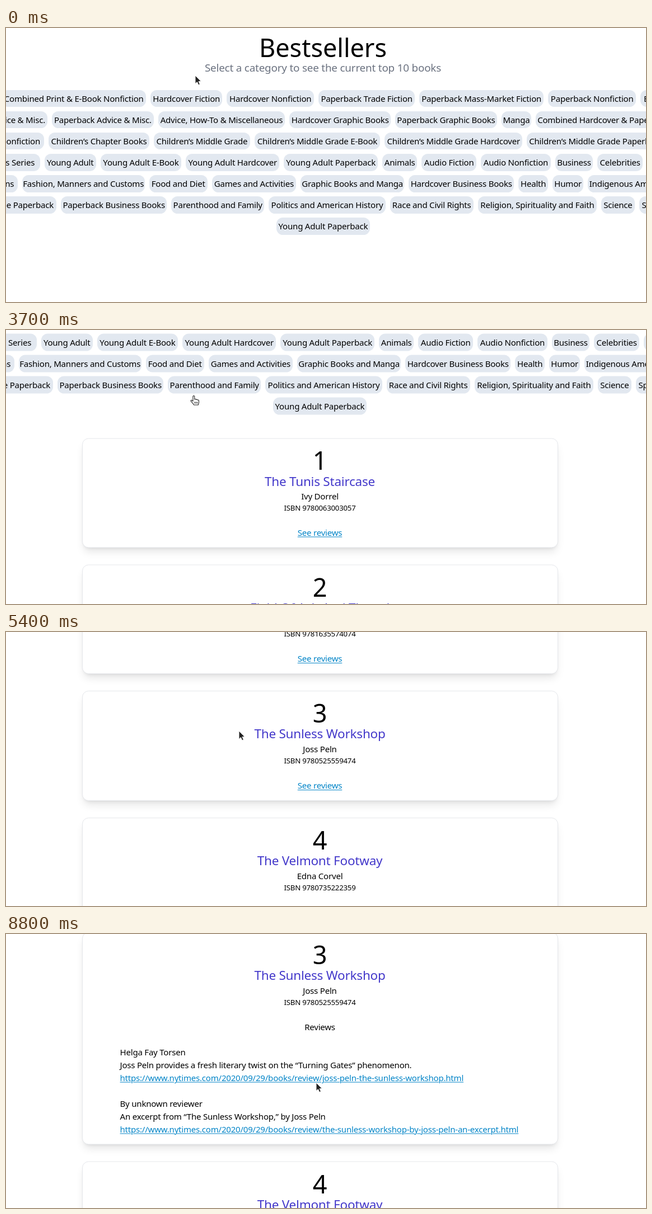
Write an HTML page that moves like this. It is 1143x490 px and loops after 9300 ms.

```html
<!DOCTYPE html>
<html lang="en">
<head>
<meta charset="utf-8">
<title>Bestsellers</title>
<style>
html { font-size: 15.25px; }
html, body { margin: 0; width: 100%; height: 100%; overflow: hidden; background: #fff; }
body { position: relative; color: #000; font: .985rem/1.5rem "Noto Sans", "Open Sans", sans-serif; letter-spacing: -.014em; white-space: nowrap; }
#page { position: absolute; inset: 0; }
#head { position: absolute; top: 12px; width: 1132px; text-align: center; }
h1 { margin: 0; font-size: 2.95rem; line-height: 3rem; font-weight: 400; letter-spacing: 0; }
.sub { font-size: 1.235rem; line-height: 1.75rem; letter-spacing: -.01em; color: #6b7280; }
.chip { position: absolute; padding: .25rem 0; border-radius: .75rem; background: #e2e8f0; text-align: center; }
#cards { position: absolute; left: 135.5px; top: 411.5px; width: 850px; }
.card { box-sizing: border-box; margin-bottom: 2rem; padding: 1rem; border: 1px solid #e5e7eb; border-radius: .75rem; background: #fff; text-align: center; box-shadow: 0 10px 15px -3px #0000001a, 0 4px 6px -4px #0000001a; }
.rank { font-size: 2.95rem; line-height: 3rem; letter-spacing: 0; }
.name { font-size: 1.475rem; line-height: 2rem; color: #4338ca; }
.isbn { font-size: .865rem; line-height: 1.25rem; margin-bottom: 1.5rem; }
.link { color: #0284c7; text-decoration: underline; text-decoration-thickness: 1px; text-underline-offset: 2px; }
.review { margin-top: 1.5rem; padding-left: 51.8px; text-align: left; }
.spinner { display: block; width: 2.5rem; height: 2.5rem; margin: 0 auto; }
#wait { position: absolute; left: 547px; top: 396px; }
#cursor { position: absolute; left: 0; top: 0; width: 30px; height: 30px; overflow: visible; }
[hidden] { display: none !important; }
</style>
</head>
<body>
<div id="page">
  <div id="head">
    <h1>Bestsellers</h1>
    <div class="sub">Select a category to see the current top 10 books</div>
  </div>
  <div id="chips"></div>
  <div id="wait"></div>
  <div id="cards"></div>
</div>
<svg id="cursor">
  <path id="arrow" d="M0 0V14.5L3.4 11.5L5.7 16.8L8.3 15.7L6 10.5H10.4Z" fill="#222" stroke="#fff" stroke-width=".9"/>
  <path id="hand" d="M1.2 .2C2.3 -.9 3.8 -.2 3.8 1.2V6C5 5.2 6.2 5.5 6.5 6.5C7.7 5.8 8.8 6.2 9.1 7.2C10.4 6.7 11.4 7.4 11.4 8.8V11.5C11.4 13 10.5 13.8 10.3 16H2.4C2 13.7 -.7 11.8 -2.8 9.2C-3.5 8 -2 6.8 -.8 7.8L.9 9.3V1.2Q.9 .5 1.2 .2ZM4 10.5V13.5M6.3 10.5V13.5M8.6 10.5V13.5" fill="#fff" stroke="#222" stroke-width="1.1" stroke-linejoin="round"/>
  <path id="beam" d="M-3 -6.5H-1Q0 -6.5 0 -5.5Q0 -6.5 1 -6.5H3M0 -5.5V5.5M-3 6.5H-1Q0 6.5 0 5.5Q0 6.5 1 6.5H3" fill="none" stroke="#222" stroke-width="1.1"/>
</svg>
<script>
const LOOP = 9300, STEP = 100;
const $ = id => document.getElementById(id);

// Each row: chip labels, then their left edges and the end of the row.
const rows = [
  ["Combined Print & E-Book Nonfiction|Hardcover Fiction|Hardcover Nonfiction|Paperback Trade Fiction|Paperback Mass-Market Fiction|Paperback Nonfiction|E-Book Fiction",
    [-8, 258, 394, 558, 738, 968, 1133, 1249]],
  ["Hardcover Advice & Misc.|Paperback Advice & Misc.|Advice, How-To & Miscellaneous|Hardcover Graphic Books|Paperback Graphic Books|Manga|Combined Hardcover & Paperback Fiction",
    [-107, 82, 271.5, 506, 695, 884.5, 946, 1245]],
  ["E-Book Nonfiction|Children’s Chapter Books|Children’s Middle Grade|Children’s Middle Grade E-Book|Children’s Middle Grade Hardcover|Children’s Middle Grade Paperback",
    [-69, 75.5, 264, 443.5, 676, 930, 1185]],
  ["Children’s Series|Young Adult|Young Adult E-Book|Young Adult Hardcover|Young Adult Paperback|Animals|Audio Fiction|Audio Nonfiction|Business|Celebrities|Crime",
    [-70, 68.5, 168.5, 321, 496, 672, 742, 848, 980.5, 1056, 1145, 1200]],
  ["Expeditions|Fashion, Manners and Customs|Food and Diet|Games and Activities|Graphic Books and Manga|Hardcover Business Books|Health|Humor|Indigenous Americans",
    [-72, 28.5, 255.5, 367.5, 526, 719, 915, 976, 1039, 1206]],
  ["Middle Grade Paperback|Paperback Business Books|Parenthood and Family|Politics and American History|Race and Civil Rights|Religion, Spirituality and Faith|Science|Sports",
    [-89, 98, 295, 469, 685.5, 842.5, 1063, 1130.5, 1192]],
  ["Young Adult Paperback", [483, 657.5]]
];
const books = [
  ["The Tunis Staircase", "Ivy Dorrel", "9780063003057"],
  ["Field Of Ash And Thread", "Hanna B. Lorn", "9781635574074"],
  ["The Sunless Workshop", "Joss Peln", "9780525559474"],
  ["The Velmont Footway", "Edna Corvel", "9780735222359"]
];
const site = "https://www.nytimes.com/2020/09/29/books/review/";
const reviews = [
  ["Helga Fay Torsen", "Joss Peln provides a fresh literary twist on the “Turning Gates” phenomenon.", "joss-peln-the-sunless-workshop.html"],
  ["By unknown reviewer", "An excerpt from “The Sunless Workshop,” by Joss Peln", "the-sunless-workshop-by-joss-peln-an-excerpt.html"]
];

function add(parent, cls, text = "") {
  const el = document.createElement("div");
  el.className = cls;
  el.textContent = text;
  return parent.appendChild(el);
}
function addSpinner(parent) {
  parent.innerHTML = `<svg class="spinner" viewBox="0 0 40 40" fill="none" stroke-width="4">
    <circle cx="20" cy="20" r="17" stroke="#e5e7eb"/>
    <path d="M20 3A17 17 0 0 1 37 20" stroke="#0284c7" stroke-linecap="round"/></svg>`;
  return parent.firstChild;
}

rows.forEach(([labels, xs], r) => labels.split("|").forEach((label, i) => {
  const chip = add($("chips"), "chip", label);
  chip.style.left = xs[i] + "px";
  chip.style.top = 110.75 + r * 38.1 + "px";
  chip.style.width = xs[i + 1] - xs[i] - 7.6 + "px";
}));
const picked = $("chips").children[1];

const slots = books.map(([name, author, isbn], i) => {
  const card = add($("cards"), "card");
  add(card, "rank", i + 1);
  add(card, "name", name);
  add(card, "author", author);
  add(card, "isbn", "ISBN " + isbn);
  const slot = add(card, "slot");
  const link = document.createElement("span");
  link.className = "link";
  link.textContent = "See reviews";
  add(slot, "see").append(link);
  return slot;
});
const see = slots[2].firstChild;
const load = add(slots[2], "load");
const list = add(slots[2], "list");
add(list, "", "Reviews");
for (const [who, quote, path] of reviews) {
  const box = add(list, "review");
  add(box, "", who);
  add(box, "", quote);
  const link = document.createElement("span");
  link.className = "link";
  link.textContent = site + path;
  add(box, "").append(link);
}
const spinA = addSpinner($("wait")), spinB = addSpinner(load);

// Keys are [time, ...values]; tween is linear, pick holds.
const scroll = [[3200, 0], [3300, 46.5], [3700, 218.5], [4500, 545], [4900, 760], [8500, 760], [8600, 802], [8700, 850], [8800, 868.5]];
const pointer = [[400, 338, 85], [500, 338, 89], [600, 337, 101], [700, 335, 113], [800, 333, 118], [5100, 333, 118],
  [5200, 351, 131], [5300, 381, 153], [5400, 416, 177], [5500, 470, 215], [5600, 528, 250], [5700, 562, 264], [5800, 554, 266]];
const shapes = [[0, "arrow"], [700, "hand"], [3800, "arrow"], [5700, "hand"], [6100, "arrow"], [7200, "beam"], [8700, "arrow"]];

function tween(keys, t) {
  const i = keys.findIndex(k => k[0] > t);
  if (i === 0) return keys[0].slice(1);
  if (i < 0) return keys[keys.length - 1].slice(1);
  const a = keys[i - 1], b = keys[i], f = (t - a[0]) / (b[0] - a[0]);
  return a.slice(1).map((v, n) => v + (b[n + 1] - v) * f);
}
const pick = (keys, t) => keys.filter(k => k[0] <= t).pop()[1];
const show = (el, on) => { el.toggleAttribute("hidden", !on); };
const spin = (el, ms) => { el.style.transform = `rotate(${Math.max(0, ms) * .36}deg)`; };

function draw(t) {
  const loaded = t >= 2500;
  const [y] = tween(scroll, t), [cx, cy] = tween(pointer, t), shape = pick(shapes, t);
  $("page").style.transform = `translateY(${-y}px)`;
  $("head").style.left = $("chips").style.left = loaded ? "-6px" : "0";
  $("chips").style.transform = `translateX(${loaded ? -6 : 0}px)`;
  picked.style.background = t >= 700 ? "#38bdf8" : "";
  show($("wait"), t >= 1300 && !loaded);
  spin(spinA, Math.min(t, 2300) - 1400);
  show($("cards"), loaded);
  show(see, t < 6100);
  show(load, t >= 6100 && t < 7100);
  spin(spinB, t - 6100);
  show(list, t >= 7100);
  $("cursor").style.transform = `translate(${cx}px, ${cy}px)`;
  for (const id of ["arrow", "hand", "beam"]) $(id).style.display = id === shape ? "" : "none";
}

const start = performance.now();
function tick() {
  const t = (performance.now() - start) % LOOP;
  draw(Math.floor(t / STEP) * STEP);
  requestAnimationFrame(tick);
}
tick();
</script>
</body>
</html>
```
